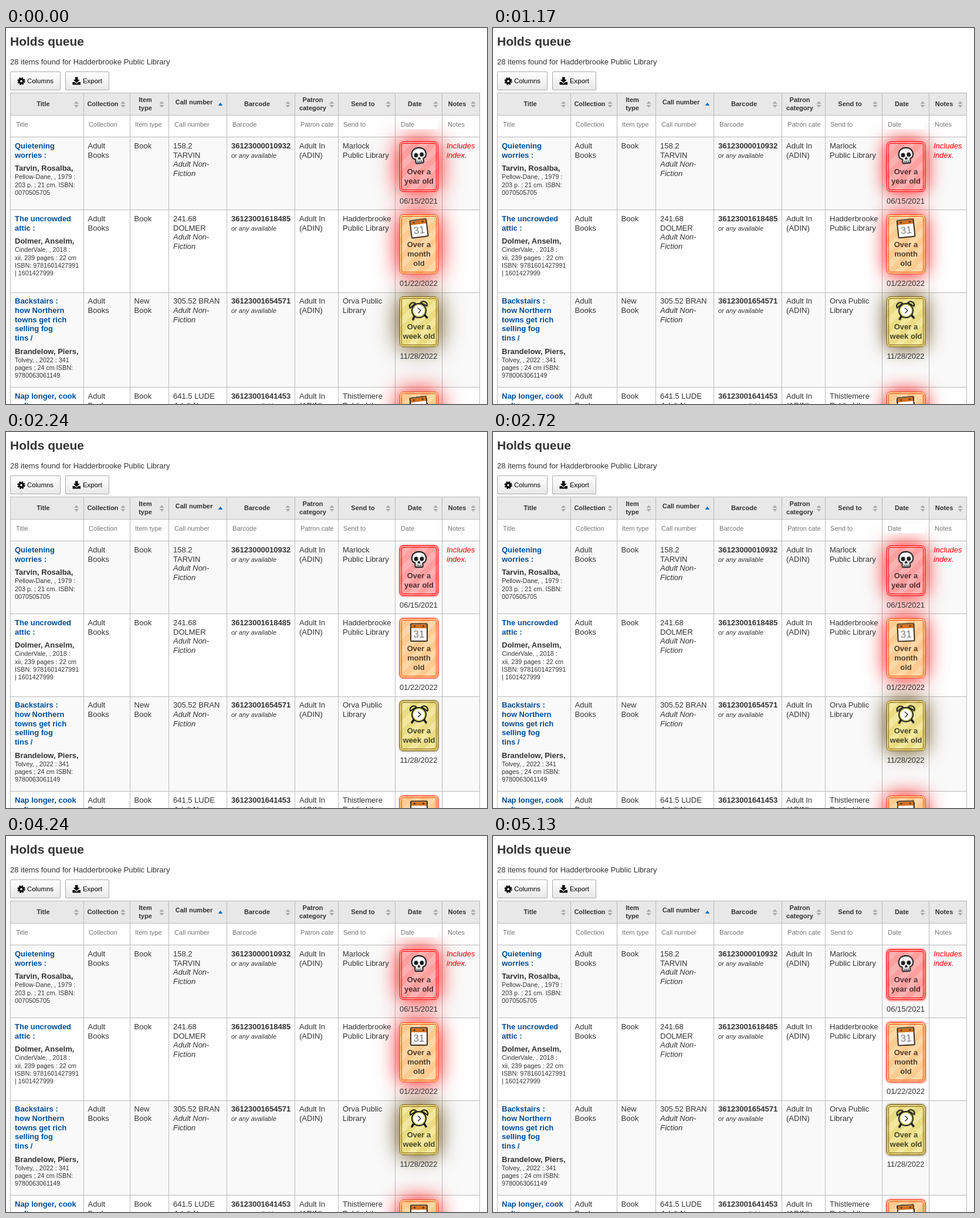
An HTML page that plays this animation: 820x640 px, repeating every 5.17 s.

```html
<!DOCTYPE html>
<html lang="en">
<head>
<meta charset="utf-8">
<title>Holds queue</title>
<style>
html, body { margin: 0; width: 100%; height: 100%; overflow: hidden; background: #fefefe; }
#stage { position: relative; width: 820px; height: 640px; overflow: hidden; }
#stage > svg { position: absolute; left: 0; top: 0; }
text { font: 13px "Liberation Sans", Arial, sans-serif; fill: #333; white-space: pre; }
.h1 { font-size: 21px; font-weight: bold; }
.b { font-weight: bold; }
.i { font-style: italic; }
.title { font-weight: bold; fill: #004d99; }
.pub { font-size: 10.8px; }
.any { font-size: 11px; font-style: italic; }
.note { font-style: italic; fill: #e00; }
.head { font-size: 11px; font-weight: bold; text-anchor: middle; }
.filter { font-size: 11.1px; fill: #757575; }
.btn { font-size: 11.4px; fill: #000; }
.mid { text-anchor: middle; }
.tag { font-weight: bold; text-anchor: middle; fill: #000; fill-opacity: .7; }

.card {
  position: absolute; left: 671px; width: 66px; box-sizing: border-box;
  border: 4px double var(--line); border-radius: 6px;
  background: repeating-linear-gradient(-45deg, var(--a) 0 10px, var(--b) 10px 20px) border-box;
  animation: glow 1500ms -710ms infinite;
}
.year  { --line: #f00; --glow: #f00; --a: #ff9f9f; --b: #ffb0b0; }
.month { --line: #f8430a; --glow: #f00; --a: #ffcb90; --b: #ffd8a6; }
.week  { --line: #7c5a08; --glow: #5c3e04; --a: #eadc82; --b: #f2e79c; }
@keyframes glow {
  0%, 100% { box-shadow: 0 0 3px var(--glow); }
  50% { box-shadow: 0 0 40px var(--glow); }
}
.wiggle { animation: wiggle 200ms -155ms ease-in-out infinite alternate; }
@keyframes wiggle { to { transform: rotate(-8deg); } }
</style>
</head>
<body>
<div id="stage">
  <svg id="grid" width="820" height="640"></svg>
  <div id="cards"></div>
  <svg id="ink" width="820" height="640">
    <defs>
      <linearGradient id="face" x2="0" y2="1">
        <stop stop-color="#fff"/><stop offset="1" stop-color="#e8e8e8"/>
      </linearGradient>
      <g id="year" stroke-linejoin="round" transform="scale(.94)">
        <path d="M0-14C-9-14-13-8-13-2C-13 2-11 5-7 6V12Q-7 14-5 14H5Q7 14 7 12V6C11 5 13 2 13-2C13-8 9-14 0-14Z" fill="#fff" stroke="#1c1c1c" stroke-width="2.2"/>
        <ellipse cx="-5.2" cy="-1" rx="3.7" ry="4" fill="#1c1c1c"/>
        <ellipse cx="5.2" cy="-1" rx="3.7" ry="4" fill="#1c1c1c"/>
        <path d="M0 3L-2 6.5H2ZM-3.3 9V13M0 9V13M3.3 9V13" fill="#1c1c1c" stroke="#1c1c1c" stroke-width="1.4"/>
      </g>
      <g id="month">
        <rect x="-14" y="-14.5" width="28" height="29.5" rx="1" fill="#fff" stroke="#3f3224" stroke-width="2"/>
        <path d="M-13-13.5H13V-7H-13Z" fill="#d4701c"/>
        <circle cx="-7.5" cy="-10.5" r="1.5" fill="#3f3224"/>
        <circle cx="7.5" cy="-10.5" r="1.5" fill="#3f3224"/>
        <text class="mid" y="9" style="font-size:17px;fill:#777">31</text>
      </g>
      <g id="week" stroke="#1c1c1c" stroke-width="2" stroke-linecap="round" stroke-linejoin="round">
        <path d="M-9 9L-12 13.500M9 9L12 13.500" stroke-width="3.6"/>
        <path id="bell" d="M-14.500-6C-17-13-9-17-4.500-13Z" fill="#d6d36a"/>
        <use href="#bell" transform="scale(-1 1)"/>
        <circle r="12" fill="#d6d36a"/>
        <circle r="9.3" fill="#fff" stroke="none"/>
        <path d="M-1.500-4.500L3 0L-1.500 4" fill="none" stroke-width="1.3"/>
      </g>
    </defs>
  </svg>
</div>
<script>
const $ = id => document.getElementById(id);
const add = (to, markup) => $(to).insertAdjacentHTML('beforeend', markup);

const text = (x, y, lines, cls = '', step = 16) =>
  lines.split('|').forEach((line, i) =>
    add('ink', `<text x="${x}" y="${y + i * step}" class="${cls}">${line}</text>`));

const rect = (x, y, w, h, fill, extra = '') =>
  `<rect x="${x}" y="${y}" width="${w}" height="${h}" fill="${fill}" ${extra}/>`;

// Table background and rules
const cols = [7, 132, 211, 277, 376, 492, 566, 663, 743, 807];
const rules = [110, 148, 185, 309, 450, 611];
add('grid', rect(7, 110, 801, 38, '#e8e8e8') + rect(7, 185, 801, 124, '#f9f9f9') +
  rect(7, 450, 801, 161, '#f9f9f9'));
cols.forEach(x => add('grid', rect(x, 110, 1, 530, '#bbb')));
rules.forEach(y => add('grid', rect(7, y, 801, 1, '#bbb')));

// Page heading and buttons
text(7, 30, 'Holds queue', 'h1');
text(7, 62, '28 items found for Hadderbrooke Public Library');
const frame = 'rx="1.5" stroke="#aaa"';
add('ink', rect(7.5, 74.5, 85, 31, 'url(#face)', frame) + rect(101.5, 74.5, 74, 31, 'url(#face)', frame));
add('ink', `<g transform="translate(26 90.5)">
  <circle r="3.5" fill="none" stroke="#000" stroke-width="3.2"/>
  <circle r="5.6" fill="none" stroke="#000" stroke-width="2" stroke-dasharray="2.6 1.798"/></g>
  <path d="M118 83.5h4.5v4.5h3.3l-5.5 5.5l-5.5-5.5h3.2ZM113.5 92h3.5l3.3 3l3.3-3h3.4v4.5h-13.5Z"/>`);
text(36, 94, 'Columns', 'btn');
text(131, 94, 'Export', 'btn');

// Column heads: label, centre, sort arrow x, filter x
const heads = [
  ['Title', 63.5, 120, 17],
  ['Collection', 165, 199.5, 141],
  ['Item|type', 237.5, 265.5, 220, 'Item type'],
  ['Call number', 320.5, 365.5, 287],
  ['Barcode', 428, 480.5, 386],
  ['Patron|category', 523, 555.5, 502, 'Patron cate'],
  ['Send to', 608.5, 651.5, 575],
  ['Date', 697, 732.5, 673],
  ['Notes', 769, 796.5, 753],
];
add('ink', rect(671, 156, 66, 16, '#fff'));
heads.forEach(([label, mid, arrow, left, hint = label]) => {
  const sorted = label === 'Call number';
  const y = label.includes('|') ? 126 : sorted ? 130 : 133;
  text(mid, y, label, 'head', 14);
  text(left, 168, hint, 'filter');
  add('ink', sorted
    ? `<path d="M${arrow - 4} 132h8l-4-5z" fill="#0a6ebd"/>`
    : `<path d="M${arrow - 4} 129h8l-4-4.5zm0 2h8l-4 4.5z" fill="#aaa"/>`);
});

const rows = [
  { top: 185, title: 'Quietening|worries :', author: 'Tarvin, Rosalba,',
    pub: 'Pellow-Dane, , 1979 :|203 p. ; 21 cm. ISBN:|0070505705',
    type: 'Book', call: '158.2|TARVIN', code: '36123000010932',
    to: 'Marlock|Public Library', age: 'year', tag: 'Over a|year old',
    date: '06/15/2021', note: 'Includes|index.' },
  { top: 309, title: 'The uncrowded|attic :', author: 'Dolmer, Anselm,',
    pub: 'CinderVale, , 2018 :|xii, 239 pages : 22 cm|ISBN: 9781601427991|&#124; 1601427999',
    type: 'Book', call: '241.68|DOLMER', code: '36123001618485',
    to: 'Hadderbrooke|Public Library', age: 'month', tag: 'Over a|month|old', date: '01/22/2022' },
  { top: 449, title: 'Backstairs :|how Northern|towns get rich|selling fog|tins /',
    author: 'Brandelow, Piers,',
    pub: 'Tolvey, , 2022 : 341|pages ; 24 cm ISBN:|9780063061149',
    type: 'New|Book', call: '305.52 BRAN', code: '36123001654571',
    to: 'Orva Public|Library', age: 'week', tag: 'Over a|week old', date: '11/28/2022' },
  { top: 611, title: 'Nap longer, cook|softer', type: 'Book', call: '641.5 LUDE',
    code: '36123001641453', to: 'Thistlemere|Public Library', age: 'month', tag: 'Over a|month|old' },
];

rows.forEach(r => {
  const y = r.top + 20;
  if (r.author) {
    const authorY = y + 6.6 + r.title.split('|').length * 15.8;
    text(15, authorY, r.author, 'b');
    text(15, authorY + 14, r.pub, 'pub', 13.3);
  }
  text(15, y, r.title, 'title', 15.8);
  text(139.5, y, 'Adult|Books');
  text(218.5, y, r.type);
  text(285, y, r.call);
  text(285, y + r.call.split('|').length * 15.7, 'Adult Non-|Fiction', 'i');
  text(384, y, r.code, 'b');
  text(384, y + 15.5, 'or any available', 'any');
  text(500, y, 'Adult In|(ADIN)');
  text(574, y, r.to);
  if (r.note) text(751, y, r.note, 'note');

  const tagHeight = r.tag.split('|').length * 16;
  add('cards', `<div class="card ${r.age}" style="top:${r.top + 8}px;height:${54 + tagHeight}px"></div>`);
  add('ink', `<g transform="translate(704 ${r.top + 32})"><g class="wiggle"><use href="#${r.age}"/></g></g>`);
  text(704, r.top + 64, r.tag, 'tag');
  if (r.date) text(703.5, r.top + 82 + tagHeight, r.date, 'mid');
});

// The whole scene restarts every loop
const LOOP = 5170;
const motions = document.getAnimations();
motions.forEach(m => m.pause());
const start = performance.now();
function tick() {
  const t = (performance.now() - start) % LOOP;
  motions.forEach(m => { m.currentTime = t; });
  requestAnimationFrame(tick);
}
tick();
</script>
</body>
</html>
```
